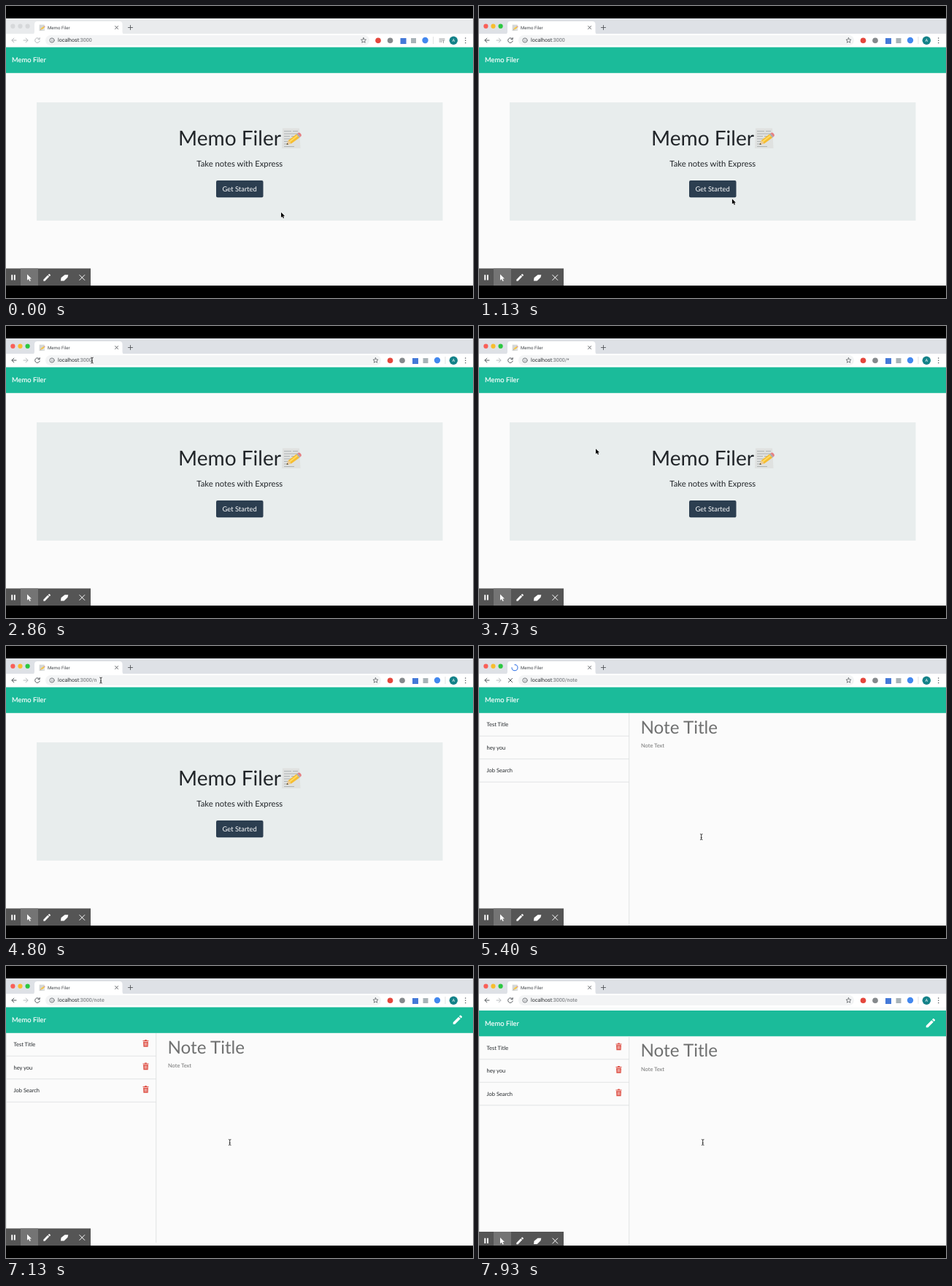
Recreate the animation shown at these times as an HTML page. Size 640 by 400 pixels, loop 8 s.

```html
<!DOCTYPE html>
<html lang="en">
<head>
<meta charset="utf-8">
<title>Memo Filer</title>
<style>
  html, body { margin: 0; width: 100%; height: 100%; overflow: hidden; background: #000; }
  svg { display: block; width: 100vw; height: 100vh; }
  text { font-family: Lato, sans-serif; text-rendering: geometricPrecision; white-space: pre; }
  .ui text { font-family: Roboto, sans-serif; }
  .line { fill: none; stroke: currentColor; stroke-linecap: round; stroke-linejoin: round; }
</style>
</head>
<body>
<svg viewBox="0 0 640 400">
  <defs>
    <clipPath id="view"><rect y="56" width="640" height="327"/></clipPath>
    <g id="memo">
      <path d="M1 0H24L25.5 27.5H0Z" fill="#dfe1e0"/>
      <path d="M3 4h10m2 0h7M3 7.5h18M3 11h8m2 0h6M3 14.500h9M3 18h7M3 21.500h6M3 25h14" stroke="#a3a7a7" stroke-width=".8"/>
      <path d="M6.500 22.500L9 16.500L20 8L24 13L13 21Z" fill="#f5bd31"/>
      <path d="M10.500 18.500L21.500 10" stroke="#ffdc66" stroke-width="1.600"/>
      <path d="M6.500 22.500L9 16.500L13 21Z" fill="#eccb9c"/>
      <path d="M6.500 22.500L7.400 20.300L8.900 21.900Z" fill="#333"/>
      <path d="M20 8L21.500 6.800L25.500 11.800L24 13Z" fill="#a9adb0"/>
      <path d="M21.500 6.800Q24 5 26 7.500T25.500 11.800Z" fill="#e57f83"/>
    </g>
    <g id="pen"><path d="M-6 6V3.400L1.500 -4.100L4.100 -1.500L-3.400 6ZM2.300 -4.900L3.600 -6.200Q4.200 -6.600 4.800 -6.100L6.100 -4.800Q6.600 -4.200 6.200 -3.600L4.900 -2.300Z"/></g>
    <g id="trash">
      <path d="M-4 -4H-1.700L-1.200 -4.900H1.200L1.700 -4H4V-2.900H-4ZM-3.500 -2.300H3.500L3.100 4.700H-3.100Z" fill="#df5146"/>
      <path d="M-1.500 -1V3.300M0 -1V3.300M1.500 -1V3.300" stroke="#fbfbfb" stroke-width=".6"/>
    </g>
    <path id="pointer" d="M0 0V8.300L2 6.500L3.400 9.600L4.800 9L3.400 6H6Z"/>
  </defs>

  <g class="ui">
    <rect id="strip" y="17" width="640" height="22"/>
    <path d="M35 39Q39 39 39 35V25Q39 21 43 21H155.500Q159.500 21 159.500 25V35Q159.500 39 163.500 39Z" fill="#fff"/>
    <rect y="38" width="640" height="18.500" fill="#fff"/>
    <g id="lights"><circle cx="9.400" cy="27.700" r="3.100"/><circle cx="19.500" cy="27.700" r="3.100"/><circle cx="29.600" cy="27.700" r="3.100"/></g>
    <use id="favicon" href="#memo" transform="translate(45.300 25.500) scale(.31)"/>
    <path id="spinner" class="line" d="M49 25.700A4 4 0 1 1 45 29.700" color="#4a83e8" stroke-width="1.200"/>
    <text x="57" y="31.800" font-size="6.100" fill="#45494d">Memo Filer</text>
    <path class="line" color="#55595d" d="M149.600 27.500l4 4m0 -4l-4 4M167.500 29.500h6m-3 -3v6" stroke-width=".9"/>
    <g id="nav" class="line" stroke-width="1">
      <path d="M14 47H8m2.800 -2.900L8 47l2.800 2.900"/>
      <path d="M24 47h6m-2.800 -2.900L30 47l-2.800 2.900" color="#b9bcbf"/>
      <path id="reload" d="M45.600 45A3.300 3.300 0 1 0 46.200 48M46.200 43.500V45.700H44"/>
      <path id="stop" d="M40.400 44.400l5.200 5.200m0 -5.200l-5.200 5.200"/>
    </g>
    <rect id="omnibox" x="54" y="40" height="14" rx="7" fill="#f3f4f5"/>
    <circle class="line" color="#5f6368" cx="63" cy="47" r="3.100" stroke-width=".8"/>
    <path d="M63 46.500v2.200M63 45v.7" stroke="#5f6368" stroke-width=".8"/>
    <text x="71" y="49.300" font-size="7.100" fill="#303336">localhost<tspan id="path" fill="#686c70"></tspan></text>
    <g id="icons">
      <path class="line" color="#606468" stroke-width=".8" d="M506.500 43.600l1 2.300 2.500 .2 -1.900 1.700 .6 2.400 -2.200 -1.300 -2.200 1.300 .6 -2.400 -1.900 -1.700 2.500 -.2Z"/>
      <circle cx="526.500" cy="47.300" r="3.800" fill="#e4473d"/>
      <circle cx="543" cy="47.300" r="3.800" fill="#85898c"/>
      <rect x="557" y="44" width="8" height="8" fill="#4479d8"/>
      <rect x="571.500" y="44" width="7" height="7" fill="#a9b3b8"/>
      <circle cx="591" cy="47" r="4.200" fill="#4388ef"/>
      <path d="M602 42v10" stroke="#d5d7d9" stroke-width=".7"/>
    </g>
    <path id="playlist" class="line" color="#85898c" stroke-width=".8" d="M594 45h7m-7 2h7m-7 2h3.500m2 1.500v-3"/>
    <circle cx="613.300" cy="47.200" r="5.700" fill="#148289"/>
    <text x="613.300" y="49.200" font-size="5.700" fill="#fff" text-anchor="middle">A</text>
    <path d="M629.700 44v0m0 3.200v0m0 3.200v0" class="line" color="#505458" stroke-width="1.500"/>
  </g>

  <g clip-path="url(#view)">
    <rect y="56" width="640" height="327" fill="#fbfbfb"/>
    <g id="page">
      <rect y="56.500" width="640" height="35.300" fill="#1bbb9a"/>
      <text x="8" y="77.400" font-size="9.375" fill="#fff" stroke="#fff" stroke-width=".15">Memo Filer</text>
      <g id="home">
        <rect x="42" y="132" width="556.500" height="162" fill="#e8eded"/>
        <text x="236" y="191" font-size="28.125" fill="#212529">Memo Filer</text>
        <use href="#memo" x="378" y="167.500"/>
        <text x="320.300" y="220.300" font-size="11.250" fill="#212529" text-anchor="middle">Take notes with Express</text>
        <rect x="288" y="239" width="64.500" height="23.300" rx="2" fill="#2c3e50"/>
        <text x="320.200" y="254" font-size="9.375" fill="#fff" text-anchor="middle">Get Started</text>
      </g>
      <g id="notes">
        <path id="divider" stroke="#dfe1e2" stroke-width=".9" d="M.4 92V383M205.700 92V383"/>
        <g id="rows"></g>
        <text x="221.500" y="119.700" font-size="24.200" fill="#707171">Note Title</text>
        <text x="222" y="139.200" font-size="7.500" fill="#707171">Note Text</text>
        <use id="edit" href="#pen" x="618.700" y="73.800" fill="#fff"/>
      </g>
      <g fill="#fff">
        <rect y="359.500" width="116" height="25" fill="#555"/>
        <rect x="20" y="359.500" width="24" height="25" fill="#747474"/>
        <path d="M7.300 368.300h1.900v7.200H7.300Zm3.600 0h1.900v7.200h-1.900Z"/>
        <use href="#pointer" x="29" y="367.500"/>
        <use href="#pen" transform="translate(56 372) scale(.78)"/>
        <path d="M75.500 372.300L80.500 368.200H85.300L84.500 371.800L79.600 376.500H75Z"/>
        <path class="line" color="#fff" d="M100.800 368.500l7 7m0 -7l-7 7" stroke-width="1"/>
      </g>
    </g>
  </g>

  <g id="cursor">
    <use id="arrow" href="#pointer" transform="translate(0 -.3) scale(.85)" fill="#000" stroke="#fff" stroke-width=".8" paint-order="stroke"/>
    <path id="hand" d="M-.9 .8Q0 -.5 .7 .8V3.500L3.900 4.200Q5 4.600 4.700 6L4 9H-.5L-3 5.700Q-2.900 4.500 -.9 5.700Z" fill="#fff" stroke="#111" stroke-width=".8"/>
    <path id="beam" d="M-1.700 -3.900Q0 -3.900 0 -2.900Q0 -3.900 1.700 -3.900M0 -3V3M-1.700 3.900Q0 3.900 0 2.900Q0 3.900 1.700 3.900M-.9 .9H.9" fill="none" stroke="#222" stroke-width=".9"/>
  </g>
</svg>
<script>
const LOOP = 8000;
const $ = id => document.getElementById(id);
const show = (id, on) => { $(id).style.display = on ? '' : 'none'; };

// Keys are [time, ...values]; every segment eases in and out.
const cursorKeys = [
  [0, 377, 283], [860, 375, 282], [1000, 375, 281], [1750, 27.5, 78], [2600, 27.5, 78],
  [2850, 118, 47], [3400, 118, 47], [3650, 160, 168.500], [4250, 160, 168.500],
  [4500, 130, 47], [4900, 130, 47], [5200, 304.700, 261.500], [5500, 304.700, 261.500], [5900, 306.700, 241.500]
];
const scrollKeys = [[0, 0], [6120, 0], [6300, -4.200], [6500, -4.200], [6900, 0], [7200, 0], [7700, 4.500]];

function sample(keys, t) {
  const i = keys.findIndex(k => k[0] > t);
  if (i < 0) return keys[keys.length - 1].slice(1);
  const a = keys[i - 1], b = keys[i];
  const p = (t - a[0]) / (b[0] - a[0]), e = p * p * (3 - 2 * p);
  return a.slice(1).map((v, j) => v + (b[j + 1] - v) * e);
}

function urlPath(t) {
  const typed = (word, start) => word.slice(0, Math.max(0, Math.floor((t - start) / 90)));
  return ':3000' + (t < 4600 ? typed('/*', 2900) : typed('/note', 4600));
}

$('rows').innerHTML = ['Test Title', 'hey you', 'Job Search'].map((title, i) => {
  const y = 92 + i * 31.500;
  return `<text x="10.500" y="${y + 18}" font-size="7.500" fill="#212529">${title}</text>
    <path d="M0 ${y + 31.300}H206" stroke="#dfe1e2" stroke-width=".9"/>
    <use class="bin" href="#trash" x="191.500" y="${y + 14}"/>`;
}).join('');
const bins = document.querySelectorAll('.bin');

function draw(t) {
  const active = t >= 1000, notes = t >= 5260, loaded = t >= 5700;
  const loading = notes && !loaded;

  $('strip').setAttribute('fill', active ? '#dee1e6' : '#e9ebed');
  const lights = active ? ['#f95f57', '#f8bd2e', '#2bc840'] : Array(3).fill('#d6d8da');
  [...$('lights').children].forEach((c, i) => c.setAttribute('fill', lights[i]));
  $('nav').style.color = active ? '#55595d' : '#b4b7ba';
  $('icons').setAttribute('transform', `translate(${active ? 0 : -16.500})`);
  $('omnibox').setAttribute('width', active ? 460 : 444);
  show('playlist', !active);
  show('favicon', !loading);
  show('spinner', loading);
  show('reload', !loading);
  show('stop', loading);
  $('spinner').setAttribute('transform', `rotate(${(t - 5400) * .36} 49 29.700)`);
  $('path').textContent = urlPath(t);

  show('home', !notes);
  show('notes', notes);
  show('edit', loaded);
  bins.forEach(b => { b.style.display = loaded ? '' : 'none'; });
  const [scroll] = sample(scrollKeys, t);
  const end = loading ? 383 : 379 + Math.abs(scroll);
  $('divider').setAttribute('d', `M.4 92V${end}M205.700 92V${end}`);
  $('page').setAttribute('transform', `translate(0 ${scroll})`);

  const [x, y] = sample(cursorKeys, t);
  const beam = (y > 40 && y < 54) || (notes && x > 206 && y > 92);
  const hand = y > 68 && y < 82 && x < 54;
  $('cursor').setAttribute('transform', `translate(${x} ${y})`);
  show('beam', beam);
  show('hand', hand);
  show('arrow', !beam && !hand);
}

function tick() {
  draw(performance.now() % LOOP);
  requestAnimationFrame(tick);
}
tick();
</script>
</body>
</html>
```
